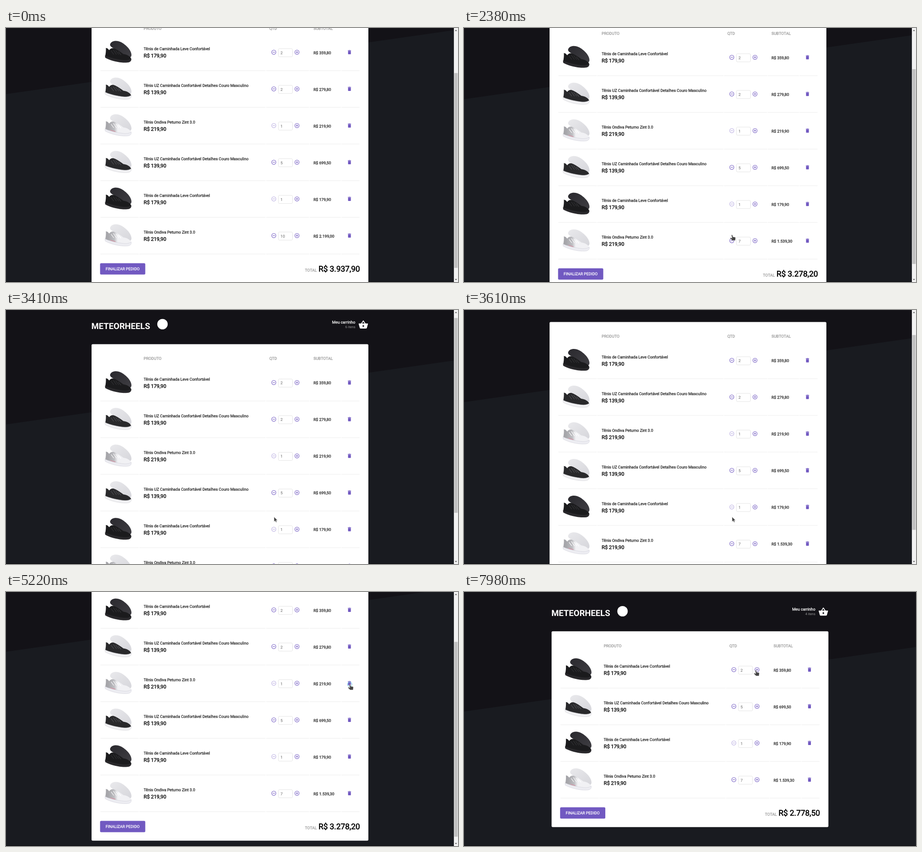
Recreate the animation shown at these times as an HTML page. Size 998 by 561 pixels, loop 8000 ms.

```html
<!DOCTYPE html>
<html lang="pt-BR">
<head>
<meta charset="utf-8">
<title>Carrinho</title>
<style>
  html, body { margin: 0; width: 100%; height: 100%; overflow: hidden; background: #191b20; }
  svg { display: block; }
  text { font: 8.73px Roboto, sans-serif; fill: currentColor; text-rendering: geometricPrecision; white-space: pre; }
  .b { stroke: currentColor; stroke-width: .034em; }
  .brand { font-size: 18.7px; font-weight: 700; }
  .count { font-size: 7.48px; color: #999; }
  .price { font-size: 11.23px; color: #000; }
  .sum { font-size: 17.46px; color: #000; text-anchor: end; }
  .gray { color: #999; }
  .dark { color: #222; }
  .qty { color: #666; }
  .white { color: #fff; }
  .icon { fill: none; stroke: #7159c1; stroke-width: 1.04; }
  .trash { fill: #7159c1; }
</style>
</head>
<body>
<svg width="998" height="561" viewBox="0 0 998 561">
  <defs>
    <linearGradient id="soleDark" x2="1" y2="1"><stop stop-color="#2a292e"/><stop offset="1" stop-color="#3f3e43"/></linearGradient>
    <linearGradient id="soleLight" x2="1" y2="1"><stop stop-color="#e9e9ec"/><stop offset="1" stop-color="#d6d6db"/></linearGradient>
    <linearGradient id="knit"><stop offset=".1" stop-color="#a6a6aa"/><stop offset=".34" stop-color="#bcbcc0"/><stop offset=".48" stop-color="#f1f1f4"/></linearGradient>
    <path id="back" d="M-18-18C-15-27 0-27 9-20.5C18-15 29-4 29 6C29 14 20 14 12 8C4 1-4-5-11-9C-16-12-19-14-18-18Z"/>
    <path id="upper" d="M-29 9C-28 3-27-2-27.5-9.5L-24-8.5L-20-4.5C-18-8-15-9.5-11-9C-4-7 3-2 11 4C19 5 27 9 28.5 15L27 18.5C16 21-8 19-29 9Z"/>
    <path id="laces" d="M-16-3L-10 5M-11-5L-4 5M-6-4L1 5M0-1L6 6" fill="none"/>
    <path id="base" d="M-29.5 7C-20 12-2 16 13 17.5C21 18 26 16 28.5 14C29.5 20 26 23 17 23C2 23.5-18 18.5-29 12Z"/>
    <g id="ring"><circle r="4.68"/><path d="M-2.6 0H2.6"/></g>
    <path id="bin" d="M6 19c0 1.1.9 2 2 2h8c1.1 0 2-.9 2-2V7H6v12zM19 4h-3.5l-1-1h-5l-1 1H5v2h14V4z"/>
  </defs>

  <rect width="998" height="561" fill="#191b20"/>
  <path id="sky" d="M0 0H998V121.5L0 264Z" fill="#131217"/>
  <rect y="560" width="998" height="1" fill="#08080a"/>

  <g id="page">
    <text class="brand white" x="188.4" y="53.2">METEORHEELS</text>
    <circle cx="345.5" cy="42.5" r="11.5" fill="#fff"/>
    <text class="b white" x="720" y="41.2">Meu carrinho</text>
    <text class="count" id="count" x="771.3" y="51.1" text-anchor="end"></text>
    <path transform="translate(777.7 32.5)scale(.9355)" fill="#fff" d="M17.21 9l-4.38-6.56c-.19-.28-.51-.42-.83-.42-.32 0-.64.14-.83.43L6.79 9H2c-.55 0-1 .45-1 1 0 .09.01.18.04.27l2.54 9.27c.23.84 1 1.46 1.92 1.46h13c.92 0 1.69-.62 1.93-1.46l2.54-9.27L23 10c0-.55-.45-1-1-1h-4.79zM9 9l3-4.4L15 9H9zm3 8c-1.1 0-2-.9-2-2s.9-2 2-2 2 .9 2 2-.9 2-2 2z"/>
    <rect id="card" x="188.9" y="86.8" width="611.2" rx="2.6" fill="#fff"/>
    <text class="b gray" x="304" y="121.6">PRODUTO</text>
    <text class="b gray" x="581.5" y="121.6">QTD</text>
    <text class="b gray" x="679" y="121.6">SUBTOTAL</text>
    <g id="rows"></g>
    <g id="foot">
      <rect x="207.7" y="475.6" width="99.8" height="25" rx="2.5" fill="#7159c1"/>
      <text class="b white" x="220.1" y="491">FINALIZAR PEDIDO</text>
      <text class="b gray" x="660" y="493.9">TOTAL</text>
      <text class="b sum" id="total" x="781.6" y="493.9"></text>
    </g>
  </g>

  <g id="bar">
    <rect x="988.9" width="9.1" height="561" fill="#f1f1f1"/>
    <path d="M991 6.5L993.5 4L996 6.5ZM991 554.5L993.5 557L996 554.5Z" fill="#505050"/>
    <rect id="thumb" x="989.7" width="7.5" fill="#c1c1c1"/>
  </g>

  <circle id="click" fill="none" stroke="#6cc5e4" stroke-width="1.1"/>
  <g id="cursor">
    <path id="arrow" d="M0 0V10.6L2.5 8.4L4.2 12.1L6 11.3L4.4 7.7H7.6Z" fill="#444" stroke="#fff" stroke-width=".5"/>
    <path id="hand" d="M-1.1.3C-.4-.6 .9-.4 1.2.6L2.2 4.2L6.8 5.1Q8.1 5.4 8 6.8L7.4 12.3H.8L-3.9 7.4Q-3.6 5.7-2 6.3L.2 7.4Z" fill="#444" stroke="#fff" stroke-width=".5"/>
    <g id="no" fill="#fff" stroke="#a9602c" stroke-width="1.6">
      <circle r="5.5"/>
      <path d="M-3.8 3.2L3.8-3.2"/>
    </g>
  </g>
</svg>

<script>
const LOOP = 8000, ROW = 81;
const $ = id => document.getElementById(id);
const show = (el, on) => { el.style.display = on ? '' : 'none'; };
const move = (el, x, y) => el.setAttribute('transform', `translate(${x} ${y})`);

const kinds = [
  { name: 'Tênis de Caminhada Leve Confortável', cents: 17990,
    back: 'url(#soleDark)', upper: '#1b1b1d', laces: '#343437', base: '#29282b', edge: 'none', accent: 'none' },
  { name: 'Tênis UZ Caminhada Confortável Detalhes Couro Masculino', cents: 13990,
    back: 'url(#soleLight)', upper: '#29292b', laces: '#505054', base: '#f1f1f3', edge: '#cfcfd3', accent: 'none' },
  { name: 'Tênis Ondiva Petumo Zint 3.0', cents: 21990,
    back: 'url(#soleLight)', upper: 'url(#knit)', laces: '#fff', base: '#ededf2', edge: '#cbcbd6', accent: '#cf9aa8' }
];
const items = [[0, 2], [1, 2], [2, 1], [1, 5], [0, 1], [2, 10]].map(([k, qty]) => ({ ...kinds[k], qty }));

// Timed changes of the cart
const drops = [[690, 9], [1190, 8], [1710, 7]];
const removals = [[5290, 2], [6200, 1]];
const clicks = [550, 1060, 1580, 5160, 6110];
const shapes = [[0, ''], [210, 'hand'], [2560, 'no'], [3180, 'arrow'], [4920, 'hand'], [6200, 'arrow'], [7700, 'hand']];

const scrollKeys = [
  [0, 118], [2379, 118], [2380, 107], [2650, 39], [2760, 11], [2830, 0],
  [3409, 0], [3410, 11], [3650, 70], [3880, 122], [4000, 132],
  [5289, 132], [5290, 66], [6199, 66], [6200, 0]
];
const cursorKeys = [
  [210, 591, 452], [340, 591, 457], [3850, 592, 457], [3950, 638, 440], [4070, 705, 402], [4180, 731, 345],
  [4320, 745, 295], [4500, 758, 228], [4650, 763, 198], [4750, 759, 204],
  [5450, 759, 204], [5900, 760, 186], [6300, 760, 186], [6880, 709, 196],
  [7250, 668, 185], [7730, 601, 171], [7790, 597, 170], [7880, 618, 168], [7980, 644, 173]
];

const money = cents =>
  'R$ ' + (cents / 100).toFixed(2).replace('.', ',').replace(/\B(?=(\d{3})+,)/g, '.');

function tween(keys, t) {
  const i = keys.findIndex(k => k[0] > t);
  if (i < 0) return keys[keys.length - 1].slice(1);
  if (!i) return keys[0].slice(1);
  const a = keys[i - 1], b = keys[i], p = (t - a[0]) / (b[0] - a[0]);
  return a.slice(1).map((v, j) => v + (b[j + 1] - v) * p);
}
const latest = (keys, t, start) => keys.reduce((v, k) => (t >= k[0] ? k[1] : v), start);

const shoe = p => `<g transform="translate(248 171.5)">
  <use href="#back" fill="${p.back}"/>
  <use href="#upper" fill="${p.upper}"/>
  <use href="#laces" stroke="${p.laces}" stroke-width="1.2"/>
  <path d="M-18 9L-6 12.5L-7 14.5L-17 11Z" fill="${p.accent}"/>
  <use href="#base" fill="${p.base}" stroke="${p.edge}" stroke-width=".6"/></g>`;

$('rows').innerHTML = items.map(p => `<g>
  ${shoe(p)}
  <text class="b dark" x="304" y="167.1">${p.name}</text>
  <text class="b price" x="304" y="183.2">${money(p.cents)}</text>
  <use class="icon less" href="#ring" x="591.3" y="171.5"/>
  <rect x="601.5" y="163.6" width="31" height="18" rx="2.3" fill="#fff" stroke="#ddd" stroke-width=".8"/>
  <text class="qty" x="606" y="175.6"></text>
  <g class="icon"><use href="#ring" x="642.5" y="171.5"/><path d="M642.5 168.9V174.1"/></g>
  <text class="b dark cost" x="679" y="175.6"></text>
  <use class="trash" href="#bin" transform="translate(752.1 165.2)scale(.52)"/>
  <path d="M208.5 212.2H293M294.2 212.2H573M574.2 212.2H669.5M670.7 212.2H739.5M740.7 212.2H780.5" stroke="#ebebeb" stroke-width=".9"/>
</g>`).join('');
const rows = [...$('rows').children].map(el => ({
  el, less: el.querySelector('.less'), qty: el.querySelector('.qty'), cost: el.querySelector('.cost')
}));

function drawCart(t) {
  const gone = removals.filter(r => t >= r[0]).map(r => r[1]);
  let n = 0, sum = 0;
  items.forEach((p, i) => {
    const row = rows[i], on = !gone.includes(i);
    show(row.el, on);
    if (!on) return;
    const qty = i === 5 ? latest(drops, t, p.qty) : p.qty;
    row.qty.textContent = qty;
    row.cost.textContent = money(qty * p.cents);
    row.less.setAttribute('opacity', qty > 1 ? 1 : .5);
    move(row.el, 0, ROW * n++);
    sum += qty * p.cents;
  });
  $('total').textContent = money(sum);
  $('count').textContent = n + ' itens';
  $('card').setAttribute('height', 432.4 + ROW * (n - 4));
  move($('foot'), 0, ROW * (n - 4));
  return n;
}

function drawScroll(t, n) {
  const [y] = tween(scrollKeys, t), ratio = 543 / (222 + ROW * n), long = n > 4;
  move($('page'), long ? 0 : 4.5, -y);
  move($('sky'), 0, -y);
  show($('bar'), long);
  $('thumb').setAttribute('y', 9 + y * ratio);
  $('thumb').setAttribute('height', 561 * ratio);
}

function drawPointer(t) {
  const shape = latest(shapes, t, '');
  ['arrow', 'hand', 'no'].forEach(id => show($(id), id === shape));
  move($('cursor'), ...tween(cursorKeys, t));

  const start = clicks.findLast(c => t >= c), age = t - start, live = age < 320;
  show($('click'), live);
  if (!live) return;
  move($('click'), ...tween(cursorKeys, start));
  $('click').setAttribute('r', 3 + 3.6 * Math.min(1, age / 120));
  $('click').setAttribute('opacity', Math.min(.95, (320 - age) / 130));
}

const began = performance.now();
function frame() {
  const t = (performance.now() - began) % LOOP;
  drawScroll(t, drawCart(t));
  drawPointer(t);
  requestAnimationFrame(frame);
}
frame();
</script>
</body>
</html>
```
